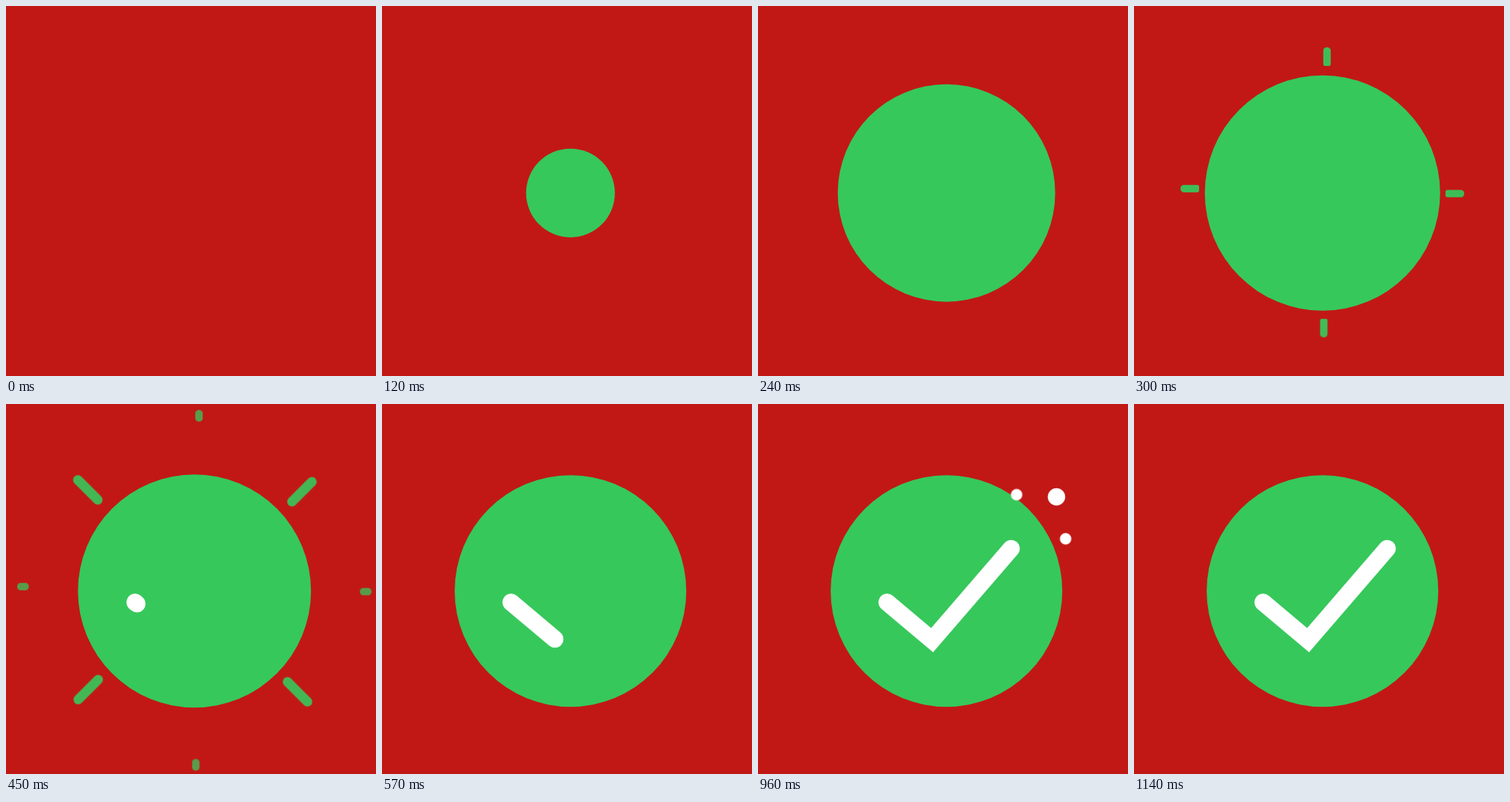
Animation of 500 by 500 pixels, one loop 1380 ms. Source, as an HTML page:

```html
<!DOCTYPE html>
<html lang="en">
<head>
<meta charset="utf-8">
<title>Success check</title>
<style>
  :root {
    --red: #c11816;
    --green: #36c85b;
    --loop: 1380ms linear infinite;
  }
  html, body { margin: 0; width: 100%; height: 100%; overflow: hidden; background: var(--red); }
  svg { display: block; width: 100vw; height: 100vh; }

  .disc { fill: var(--green); animation: grow var(--loop); }
  .rays { stroke: var(--green); stroke-linecap: round; fill: none; }
  .short { stroke-width: 10.5px; animation: shoot-short var(--loop); }
  .long { stroke-width: 13px; animation: shoot-long var(--loop); }
  .check { fill: none; stroke: #fff; stroke-width: 23.4px; stroke-linecap: round; animation: draw var(--loop); }
  .dot { fill: #fff; animation: fly var(--loop), shrink var(--loop); }

  @keyframes grow {
    0% { r: 0px; animation-timing-function: cubic-bezier(.333, 0, .667, 1); }
    21.01% { r: 159px; animation-timing-function: cubic-bezier(.333, 0, .667, 1); }
    41.3%, 100% { r: 156.5px; }
  }
  /* Each ray is a dash that extends, travels, then closes at its far end. */
  @keyframes shoot-short {
    0%, 18.11% { opacity: 0; stroke-dasharray: 0 300; stroke-dashoffset: 0; }
    18.12% { opacity: 1; stroke-dasharray: 0 300; stroke-dashoffset: 0; }
    21.16% { stroke-dasharray: 16.55 300; stroke-dashoffset: 0; }
    30.58% { stroke-dasharray: 16.55 300; stroke-dashoffset: -51.2; }
    33.7% { opacity: .74; stroke-dasharray: 0 300; stroke-dashoffset: -67.75; }
    33.71%, 100% { opacity: 0; stroke-dasharray: 0 300; stroke-dashoffset: -67.75; }
  }
  @keyframes shoot-long {
    0%, 26.87% { opacity: 0; stroke-dasharray: 0 300; stroke-dashoffset: 0; }
    26.88% { opacity: 1; stroke-dasharray: 0 300; stroke-dashoffset: 0; }
    31.16% { stroke-dasharray: 38 300; stroke-dashoffset: 0; }
    36.38% { stroke-dasharray: 38 300; stroke-dashoffset: -47; }
    40.65% { opacity: .77; stroke-dasharray: 0 300; stroke-dashoffset: -85; }
    40.66%, 100% { opacity: 0; stroke-dasharray: 0 300; stroke-dashoffset: -85; }
  }
  @keyframes draw {
    0%, 30.42% { opacity: 0; stroke-dasharray: 0 300; }
    30.43% { opacity: 1; stroke-dasharray: 0 300; animation-timing-function: cubic-bezier(.5, 0, .7, 1); }
    54.35%, 100% { opacity: 1; stroke-dasharray: 243 300; }
  }
  @keyframes fly {
    0%, 52.16% { opacity: 0; translate: 0 0; }
    52.17% { opacity: 1; translate: 0 0; animation-timing-function: cubic-bezier(.333, .667, .667, 1); }
    82.6% { opacity: 1; translate: var(--x) var(--y); }
    82.61%, 100% { opacity: 0; translate: var(--x) var(--y); }
  }
  @keyframes shrink {
    0% { scale: 1; }
    52.17% { scale: 1; animation-timing-function: cubic-bezier(.5, 0, .75, 0); }
    82.6%, 100% { scale: 0; }
  }
</style>
</head>
<body>
<svg viewBox="0 0 500 500">
  <clipPath id="outside"><rect y="-5.25" width="100" height="10.5" rx="2"/></clipPath>

  <g class="rays">
    <g clip-path="url(#outside)" transform="translate(421 253.5)"><path class="short" d="M0 0H67.75"/></g>
    <g clip-path="url(#outside)" transform="translate(256.5 422.5) rotate(90)"><path class="short" d="M0 0H67.75"/></g>
    <g clip-path="url(#outside)" transform="translate(88 246.75) rotate(180)"><path class="short" d="M0 0H67.75"/></g>
    <g clip-path="url(#outside)" transform="translate(260.75 81) rotate(-90)"><path class="short" d="M0 0H67.75"/></g>

    <path class="long" d="M0 0H85" transform="translate(370.8 365.8) rotate(45)"/>
    <path class="long" d="M0 0H85" transform="translate(134.2 362.8) rotate(135)"/>
    <path class="long" d="M0 0H85" transform="translate(133.7 139.2) rotate(225)"/>
    <path class="long" d="M0 0H85" transform="translate(376.8 141.7) rotate(-45)"/>
  </g>

  <circle class="disc" cx="254.7" cy="252.7" r="0"/>
  <path class="check" d="M174.5 268L235.3 319.2L342.2 195.2"/>

  <g transform="translate(342 195)">
    <circle class="dot" r="13.2" style="--x:74.9px;--y:-85px"/>
    <circle class="dot" r="8.7" style="--x:9.1px;--y:-88.5px"/>
    <circle class="dot" r="8.7" style="--x:90px;--y:-15.7px"/>
  </g>
</svg>
</body>
</html>
```
